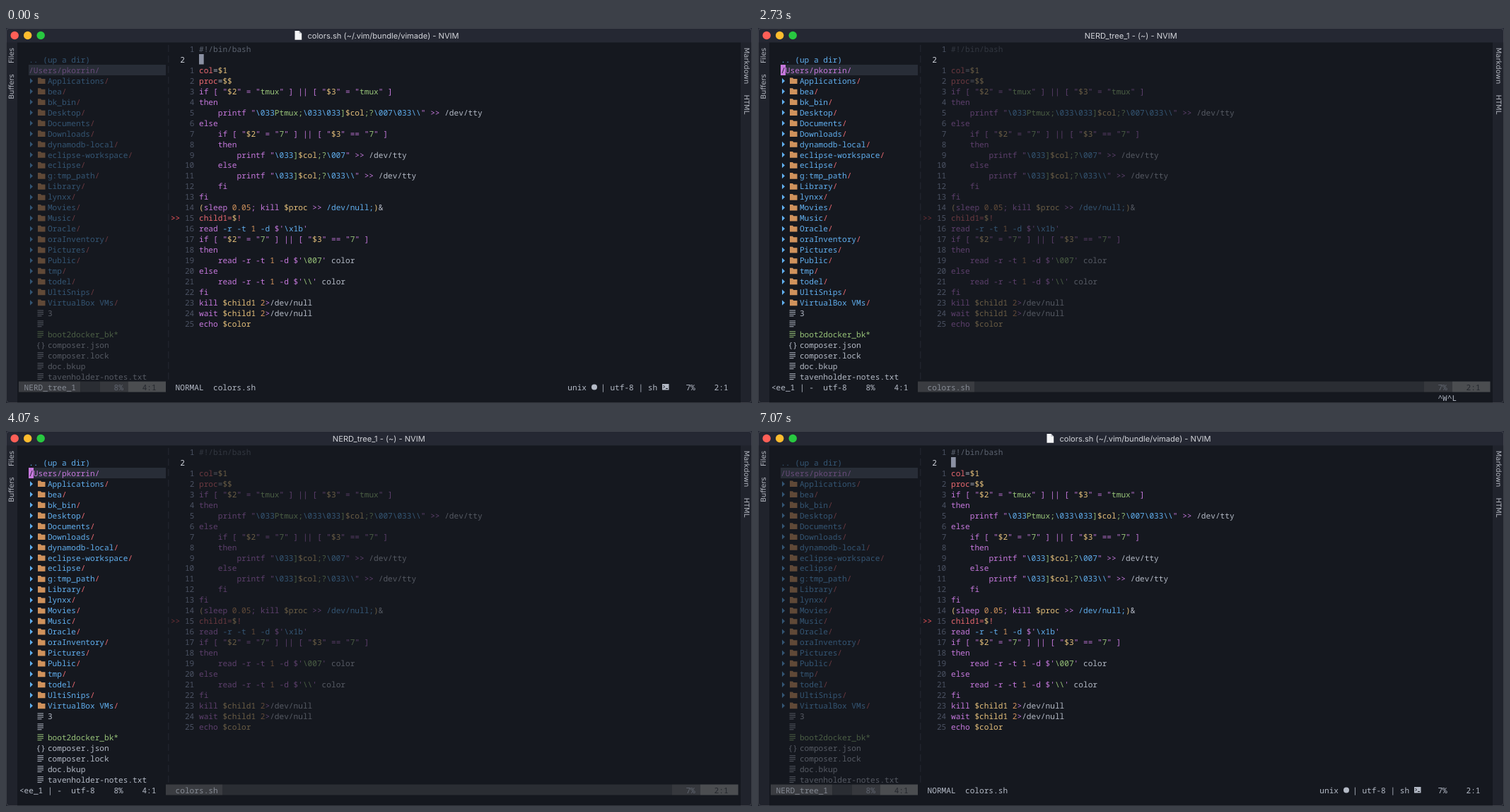
An HTML page that plays this animation: 1055 px wide and 531 px high, repeating every 7140 ms.

```html
<!DOCTYPE html>
<html lang="en">
<head>
<meta charset="utf-8">
<title>Editor window fade</title>
<style>
html, body { margin: 0; width: 100%; height: 100%; overflow: hidden; background: #15181f; }
svg { display: block; }
text { white-space: pre; text-rendering: geometricPrecision; }
.mono { font: 500 11.14px "Noto Sans Mono", "DejaVu Sans Mono", monospace; }
.title { font: 11.1px Inter, "Open Sans", sans-serif; fill: #d3d5da; text-anchor: middle; }
.side { font: 10px "DejaVu Sans", sans-serif; fill: #b4b8c1; text-anchor: middle; }
</style>
</head>
<body>
<svg id="stage" width="1055" height="531" viewBox="0 0 1055 531"></svg>
<script>
const LOOP = 7140, FADE = 260, DIM = 0.4;
const CELL = 6.684, ROW = 14.96, CODE_X = 273, TREE_X = 32.2, BAR_X = 18.9;
const COLORS = {
  p: '#c678dd', r: '#e8686f', y: '#e5c07b', b: '#61afef', g: '#98c379',
  o: '#d0925c', f: '#b4bac6', c: '#5c6370', n: '#4b5263'
};

// "^x" switches to colour x.
const CODE = String.raw`^c#!/bin/bash

^rcol^f=^y$1
^rproc^f=^y$$
^pif [ "^y$2^p" = "^gtmux^p" ] || [ "^y$3^p" = "^gtmux^p" ]
^pthen
^p    printf "^b\033^gPtmux;^b\033\033^g]^y$col^g;?^b\007\033\\^p" >> ^f/dev/tty
^pelse
^p    if [ "^y$2^p" = "^g7^p" ] || [ "^y$3^p" == "^g7^p" ]
^p    then
^p        printf "^b\033^g]^y$col^g;?^b\007^p" >> ^f/dev/tty
^p    else
^p        printf "^b\033^g]^y$col^g;?^b\033\\^p" >> ^f/dev/tty
^p    fi
^pfi
^y(^psleep ^o0.05^p; kill ^y$proc^p >> ^b/dev/null;^y)^f&
^rchild1=^y$^r!
^pread ^b-r -t ^o1 ^b-d ^p$'^b\x1b^p'
^pif [ "^y$2^p" = "^g7^p" ] || [ "^y$3^p" == "^g7^p" ]
^pthen
^p    read -r -t ^o1 ^p-d $'^g\007^p' ^fcolor
^pelse
^p    read -r -t ^o1 ^p-d $'^g\\^p' ^fcolor
^pfi
^pkill ^y$child1 ^o2^p>^f/dev/null
^pwait ^y$child1 ^o2^p>^f/dev/null
^pecho ^y$color`.split('\n');

const DIRS = ('Applications,bea,bk_bin,Desktop,Documents,Downloads,dynamodb-local,' +
  'eclipse-workspace,eclipse,g:tmp_path,Library,lynxx,Movies,Music,Oracle,' +
  'oraInventory,Pictures,Public,tmp,todel,UltiSnips,VirtualBox VMs').split(',');
const FILES = ['3', '', '^gboot2docker_bk*', 'composer.json', 'composer.lock',
  'doc.bkup', 'tavenholder-notes.txt'];

// Window switches and the pending keys shown in the command line.
const SWITCHES = [[2070, 1], [2800, 0], [3770, 1], [4600, 0]];
const KEYS = [[1870, '^W'], [2000, '^W^H'], [2070, ''], [2600, '^W'], [2700, '^W^L'],
  [2800, ''], [3640, '^W'], [3770, ''], [4470, '^W'], [4600, '']];

const stage = document.getElementById('stage');

function add(parent, tag, attrs, content) {
  const node = document.createElementNS('http://www.w3.org/2000/svg', tag);
  for (const key in attrs) node.setAttribute(key, attrs[key]);
  if (content !== undefined) node.textContent = content;
  parent.appendChild(node);
  return node;
}
const group = (parent = stage) => add(parent, 'g', {});
const rect = (parent, x, y, width, height, fill) =>
  add(parent, 'rect', { x, y, width, height, fill });
const mid = row => 30 + ROW * row;

function mono(parent, x, row, source, fill = COLORS.f) {
  const node = add(parent, 'text', { x, y: mid(row) + 3.9, class: 'mono', fill });
  source.split(/(?=\^[a-z])/).forEach(part => {
    const marked = part[0] === '^';
    const attrs = marked ? { fill: COLORS[part[1]] } : {};
    add(node, 'tspan', attrs, marked ? part.slice(2) : part);
  });
  return node;
}

function drawFrame() {
  rect(stage, 0, 0, 1055, 531, '#15181f');
  rect(stage, 0, 20, 16, 511, '#20232c');
  rect(stage, 1039, 20, 16, 511, '#20232c');
  rect(stage, 0, 0, 1055, 20.5, '#252833');
  add(stage, 'rect', { x: 0.5, y: 0.5, width: 1054, height: 530, rx: 4,
    fill: 'none', stroke: '#fff', 'stroke-opacity': 0.13 });
  ['#ff5f57', '#febc2e', '#28c840'].forEach((fill, i) =>
    add(stage, 'circle', { cx: 12.2 + 18.5 * i, cy: 10.5, r: 5.7, fill }));
  const label = (x, y, turn, word) => add(stage, 'text',
    { class: 'side', transform: `translate(${x} ${y}) rotate(${turn})` }, word);
  label(11, 39, -90, 'Files');
  label(11, 83, -90, 'Buffers');
  label(1044, 53.5, 90, 'Markdown');
  label(1044, 108.3, 90, 'HTML');
  add(stage, 'path', { d: `M229.8 24V${mid(31) + 7}`, stroke: '#252932',
    'stroke-dasharray': `10 ${ROW - 10}` });
  rect(stage, 32, 52, 194, 15, '#282d37');
}

function drawCode() {
  const layer = group();
  CODE.forEach((line, row) => {
    const current = row === 1;
    const num = row === 0 ? '1' : current ? '2' : String(row - 1);
    const x = CODE_X - CELL * (current ? 4 : num.length + 1);
    mono(stage, x, row, num, current ? '#d0d4dc' : COLORS.n);
    if (line) mono(layer, CODE_X, row, line);
  });
  mono(layer, CODE_X - 6 * CELL, 16, '>>', '#f0545a');
  return layer;
}

function drawTree() {
  const layer = group(), nameX = TREE_X + 4 * CELL;
  mono(layer, TREE_X, 1, '.. (up a dir)', COLORS.b);
  mono(layer, TREE_X, 2, '/Users/pkorrin/', COLORS.p);
  DIRS.forEach((name, i) => {
    const row = i + 3, y = mid(row);
    add(layer, 'path', { d: `M34 ${y - 3.8}l4 3.8l-4 3.8z`, fill: COLORS.b });
    add(layer, 'path', { d: `M45 ${y - 4.5}h4l1.2 1.5h5.3v7.2h-10.5z`, fill: COLORS.o });
    mono(layer, nameX, row, `^b${name}^r/`);
  });
  FILES.forEach((name, i) => {
    const row = i + 25, y = mid(row);
    if (name.endsWith('.json')) mono(layer, 42.6, row, '{}');
    else add(layer, 'path', {
      d: `M44.5 ${y - 4}h8.5m-8.5 2.6h8.5m-8.5 2.6h8.5m-8.5 2.6h6`,
      stroke: name[0] === '^' ? COLORS.g : COLORS.f, fill: 'none'
    });
    mono(layer, nameX, row, name);
  });
  return layer;
}

function drawBar(parent, x, cuts, name, nameX, percent, percentX, place, placeX) {
  const fills = ['#3a3c41', '#2a2d33', '#36383d', '#4b4d50'];
  fills.forEach((fill, i) => {
    const left = i ? cuts[i - 1] : x;
    rect(parent, left, 500.5, cuts[i] - left, 15, fill);
  });
  mono(parent, nameX, 32, name, '#858a93');
  mono(parent, percentX, 32, percent, '#606570');
  mono(parent, placeX, 32, place, '#25282e');
}

// Everything that belongs to the code window having focus.
function drawCodeFocus() {
  const layer = group();
  add(layer, 'path', { d: 'M408.5 4h6l3.7 3.8v9h-9.7z', fill: '#f4f5f7' });
  add(layer, 'path', { d: 'M414.5 4v3.8h3.7z', fill: '#b9bcc3' });
  add(layer, 'text', { x: 533.5, y: 14.6, class: 'title' },
    'colors.sh (~/.vim/bundle/vimade) - NVIM');
  rect(layer, CODE_X, 37, 6.7, 14.5, '#8b91a3');
  drawBar(layer, 18, [105.5, 132.5, 172.5, 226],
    'NERD_tree_1', BAR_X + CELL, '8%', BAR_X + 20 * CELL, '4:1', BAR_X + 26 * CELL);
  const at = (col, word) => mono(layer, CODE_X + CELL * col, 32, word);
  at(-5, 'NORMAL  colors.sh');
  at(78, 'unix   | utf-8 | sh');
  at(103, '7%    2:1');
  add(layer, 'circle', { cx: 832, cy: 508.5, r: 4, fill: COLORS.f });
  rect(layer, 928, 504, 9.5, 8.5, COLORS.f);
  add(layer, 'path', { d: 'M929.5 506l2 2l-2 2m3.5 .5h3', stroke: '#15181f', fill: 'none' });
  return layer;
}

function drawTreeFocus() {
  const layer = group();
  add(layer, 'text', { x: 527.3, y: 14.6, class: 'title' }, 'NERD_tree_1 - (~) - NVIM');
  rect(layer, 32, 52, 7, 15, COLORS.p);
  mono(layer, TREE_X, 2, '/', '#20232c');
  mono(layer, BAR_X, 32, '<ee_1 | -  utf-8    8%    4:1');
  drawBar(layer, 226, [306, 942, 982, 1035.5],
    'colors.sh', CODE_X - 5 * CELL, '7%', CODE_X + 103 * CELL, '2:1', CODE_X + 109 * CELL);
  return layer;
}

drawFrame();
const code = drawCode(), tree = drawTree();
const codeFocus = drawCodeFocus(), treeFocus = drawTreeFocus();
const command = add(stage, 'text',
  { x: CODE_X + 103 * CELL, y: mid(33) + 3.9, class: 'mono', fill: COLORS.f });

const latest = (list, t, start) =>
  list.reduce((last, item) => item[0] <= t ? item : last, start);

function draw(t) {
  const [since, inTree] = latest(SWITCHES, t, [-FADE, 0]);
  const progress = Math.min(1, (t - since) / FADE);
  const focus = inTree ? progress : 1 - progress;
  tree.setAttribute('opacity', DIM + (1 - DIM) * focus);
  code.setAttribute('opacity', 1 - (1 - DIM) * focus);
  codeFocus.setAttribute('visibility', inTree ? 'hidden' : 'visible');
  treeFocus.setAttribute('visibility', inTree ? 'visible' : 'hidden');
  command.textContent = latest(KEYS, t, [0, ''])[1];
}

const begin = performance.now();
function tick() {
  draw((performance.now() - begin) % LOOP);
  requestAnimationFrame(tick);
}
tick();
</script>
</body>
</html>
```
